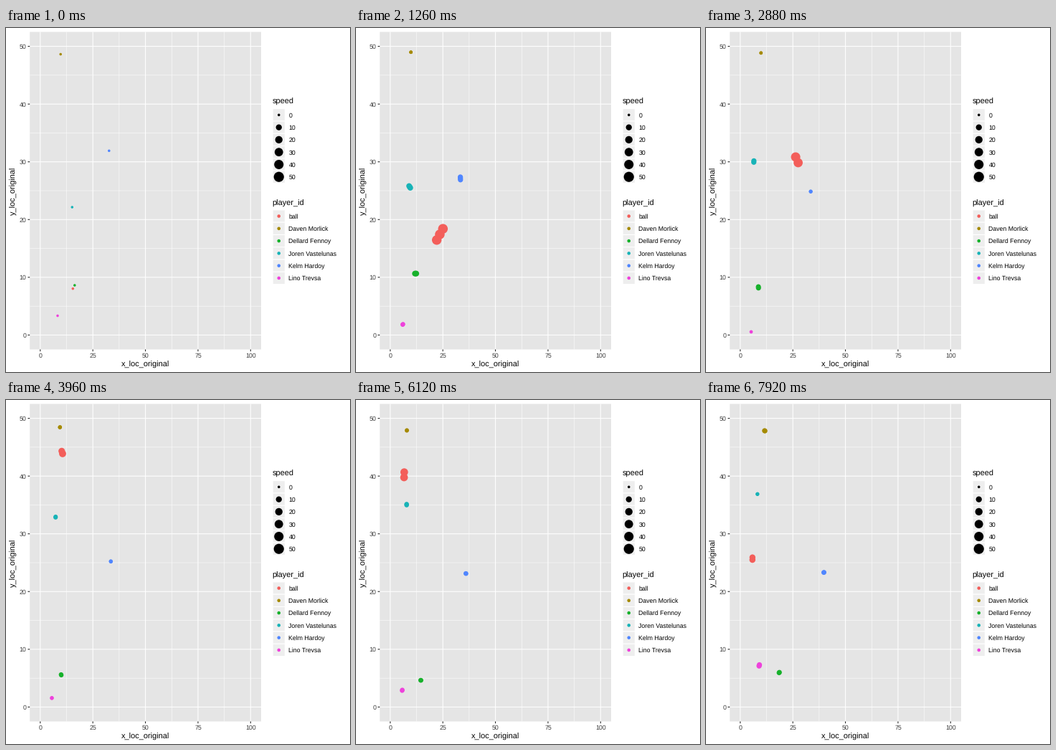
Animation, 480 px wide and 480 px high, one loop 8000 ms. Source, as a matplotlib script:

```python
import numpy as np
import matplotlib.pyplot as plt
from matplotlib.animation import FuncAnimation
from matplotlib.patches import Rectangle

SIZE, DPI = 480, 100
PT = 72 / DPI                      # points per pixel
LOOP, STEP, INTERVAL = 8000, 180, 40
X0, Y0, SX, SY = 47.8, 428.4, 2.935, 8.056
LEFT, RIGHT, TOP, BOTTOM = 33.2, 356, 5.5, 448.5
KEY, KEY_X = 17.28, 372.1
TIMES = (0, 4, 11, 22, 30, 38, 44)  # steps at which the players' paths bend

plt.rcParams.update({"font.family": "Liberation Sans", "text.hinting": "none"})


def radius(speed):
    return 1.78 + 5.3 * np.sqrt(np.asarray(speed) / 50)


def area(r):
    return (2 * np.asarray(r) * PT) ** 2


class Track:
    """Smooth path through key points x+yj, in stage pixels."""

    def __init__(self, name, color, points, times=TIMES):
        self.name, self.color = name, color
        self.t, self.p = np.array(times, float), np.array(points)
        self.slope = np.gradient(self.p, self.t)

    def at(self, t):
        t0, p, m = self.t, self.p, self.slope
        i = np.clip(np.searchsorted(t0, t, "right") - 1, 0, len(t0) - 2)
        h = t0[i + 1] - t0[i]
        u = (t - t0[i]) / h
        return ((1 + 2 * u) * (1 - u) ** 2 * p[i] + u * (1 - u) ** 2 * h * m[i]
                + u * u * (3 - 2 * u) * p[i + 1] + u * u * (u - 1) * h * m[i + 1])

    def samples(self, step):
        """Positions and radii of the two or three readings within a step."""
        if step == 0:
            return self.at(np.zeros(1)), [radius(0)]
        count = 2 + step % 2
        t = step + 0.4 * (np.arange(count) - (count - 1) / 2)
        move = self.at(t + 0.2) - self.at(t - 0.2)
        speed = 25 * np.hypot(move.real / SX, move.imag / SY)
        return self.at(t), radius(speed)


TRACKS = [
    Track("ball", "#F35E5A",
          [93.3+363.7j, 90+352j, 99+324j, 143+240j, 144+228j, 78.3+73j,
           74+52j, 70.2+51j, 65.2+170.5j, 64.8+221.3j],
          times=(0, 3, 5, 10, 13, 22, 26, 30, 38, 44)),
    Track("Daven Morlick", "#A58A00",
          [76.2+36.6j, 76.3+34.5j, 77+33.8j, 75.3+38j, 70.8+46j,
           73.3+38.8j, 82+43j]),
    Track("Dellard Fennoy", "#17B12B",
          [95.8+359j, 89.8+345.5j, 75+346j, 77+383.5j, 86+389.8j,
           95+389.8j, 102.2+380.3j]),
    Track("Joren Vastelunas", "#18B3B7",
          [92.3+250j, 81.7+232.3j, 68.2+208.6j, 69.2+163.3j, 70.5+156.5j,
           70.8+135.8j, 71.8+131.3j]),
    Track("Kelm Hardoy", "#5086FF",
          [143.8+171.3j, 145+194.5j, 146.3+225.5j, 146.3+225.2j, 150+238.7j,
           157.5+243.3j, 164.5+240.6j]),
    Track("Lino Trevsa", "#EE42DB",
          [72+401.5j, 67.8+410j, 63.2+417.2j, 63+424j, 64+415.8j, 62.5+411.8j,
           67.8+394.5j, 74.3+370.3j],
          times=(0, 4, 11, 16, 22, 30, 38, 44)),
]

fig = plt.figure(figsize=(SIZE / DPI, SIZE / DPI), dpi=DPI, facecolor="white")
ax = fig.add_axes([0, 0, 1, 1])
ax.set(xlim=(0, SIZE), ylim=(SIZE, 0))
ax.axis("off")


def label(x, y, text, size=8.8, color="black", **kw):
    ax.text(x, y, text, fontsize=size * PT, color=color, va="baseline", **kw)


def line(xs, ys, color, width):
    ax.plot(xs, ys, color=color, lw=width * PT, solid_capstyle="butt",
            zorder=1, snap=False)


def box(x, y, w, h, fill, edge="none"):
    ax.add_patch(Rectangle((x, y), w, h, fc=fill, ec=edge, lw=1.07 * PT,
                           zorder=0, snap=False))


def dots(x, y, r, colors):
    return ax.scatter(x, y, s=area(r), facecolors=colors, linewidths=0, zorder=3)


def draw_panel():
    box(LEFT, TOP, RIGHT - LEFT, BOTTOM - TOP, "#E5E5E5")
    for i in range(9):
        x = X0 + 12.5 * i * SX
        line([x, x], [TOP, BOTTOM], "white", 0.53 if i % 2 else 1.07)
    for i in range(11):
        y = Y0 - 5 * i * SY
        line([LEFT, RIGHT], [y, y], "white", 0.53 if i % 2 else 1.07)
    for v in range(0, 101, 25):
        x = X0 + v * SX
        line([x, x], [BOTTOM, BOTTOM + 2.75], "#222222", 1.07)
        label(x, 460.2, v, color="#3C3C3C", ha="center")
    for v in range(0, 51, 10):
        y = Y0 - v * SY
        line([LEFT - 2.75, LEFT], [y, y], "#222222", 1.07)
        label(28.4, y + 3.4, v, color="#3C3C3C", ha="right")
    label(194.6, 473, "x_loc_original", 11, ha="center")
    label(13.5, 227, "y_loc_original", 11, ha="center",
          rotation=90, rotation_mode="anchor")


def draw_legend(title, top, names, radii, colors):
    label(KEY_X - 0.6, top - 6.5, title, 11)
    centers = top + KEY * (np.arange(len(names)) + 0.5)
    for y, name in zip(centers, names):
        box(KEY_X, y - KEY / 2, KEY, KEY, "#EEEEEE", "white")
        label(394.5, y + 3.4, name)
    dots(np.full(len(names), KEY_X + KEY / 2), centers, radii, colors)


draw_panel()
speeds = np.arange(0, 51, 10)
draw_legend("speed", 112.7, speeds, radius(speeds), ["black"] * len(speeds))
draw_legend("player_id", 253.9, [t.name for t in TRACKS], [2.3] * len(TRACKS),
            [t.color for t in TRACKS])
players = dots([0], [0], [0], ["black"])


def update(frame):
    step = int((frame + 0.5) * INTERVAL // STEP)
    points, radii, colors = [], [], []
    for track in TRACKS:
        p, r = track.samples(step)
        points.extend(p)
        radii.extend(r)
        colors.extend([track.color] * len(r))
    players.set_offsets(np.column_stack([np.real(points), np.imag(points)]))
    players.set_sizes(area(radii))
    players.set_facecolor(colors)
    return [players]


anim = FuncAnimation(fig, update, frames=LOOP // INTERVAL, interval=INTERVAL,
                     repeat=True, repeat_delay=0)
plt.show()
```
